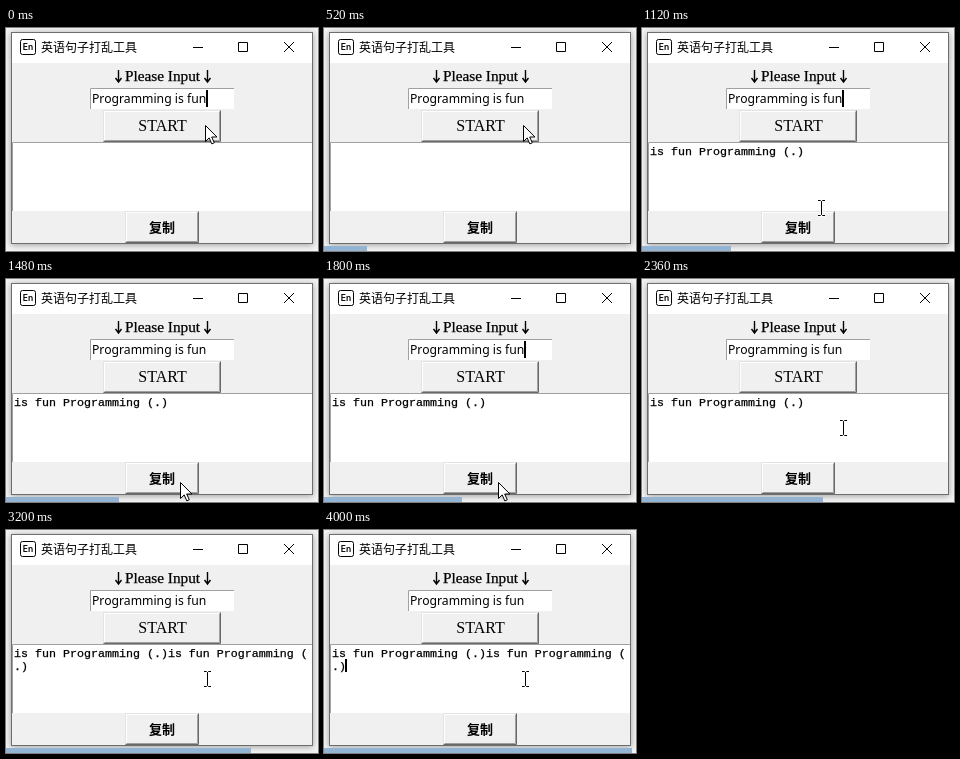
These frames come from a looping animation (312x223 px, 4040 ms). An HTML page:

```html
<!DOCTYPE html>
<html lang="zh">
<head>
<meta charset="utf-8">
<style>
  html, body { margin: 0; width: 100%; height: 100%; overflow: hidden; background: #f3f3f3; }
  svg { display: block; width: 312px; height: 223px; }
  text { white-space: pre; }
  .frame { filter: drop-shadow(0 1px 3px rgba(0, 0, 0, .35)); }
  .cjk { font-family: "Noto Sans CJK SC", "Noto Sans CJK", sans-serif; }
  .serif { font: 16px "Liberation Serif", serif; text-anchor: middle; }
  .heading { font-size: 15.3px; }
  .entry { font: 500 12.2px "Noto Sans", sans-serif; }
  .mono { font: 11.67px "Liberation Mono", monospace; }
  .heading, .mono { stroke: #000; stroke-width: .25; }
  .line { fill: none; stroke: #000; }
  .light { fill: none; stroke: #fff; }
  .pale { fill: none; stroke: #e3e3e3; }
  .dark { fill: none; stroke: #696969; }
  .mid { fill: none; stroke: #a0a0a0; }
</style>
</head>
<body>
<svg viewBox="0 0 312 223">
  <rect class="frame" x="5" y="4" width="302" height="212" fill="#6e6e6e"/>
  <rect x="6" y="5" width="300" height="30" fill="#fff"/>
  <rect x="6" y="35" width="300" height="180" fill="#f0f0f0"/>

  <rect class="line" x="14.5" y="11.5" width="15" height="15" rx="2"/>
  <text x="22" y="22" text-anchor="middle" font-family="Inter, sans-serif" font-size="8.5" font-weight="600">En</text>
  <text class="cjk" x="35" y="23.5" font-size="12">英语句子打乱工具</text>
  <path class="line" d="M187 19.5h10M232.5 14.5h9v9h-9z"/>
  <path class="line" d="M278 14l10 10m0-10l-10 10"/>

  <text class="serif heading" x="156.5" y="53">Please Input</text>
  <path class="line" stroke-width="1.4" d="M112.5 42v12m-3-4l3 4l3-4M201.5 42v12m-3-4l3 4l3-4"/>

  <rect x="84" y="60" width="144" height="21" fill="#fff"/>
  <path class="mid" d="M84.5 81V60.5H228"/>
  <text class="entry" x="86" y="75">Programming is fun</text>

  <g id="start"></g>
  <g id="copy"></g>

  <rect x="6" y="114" width="300" height="69" fill="#fff"/>
  <path class="mid" d="M6.5 183V114.5H306"/>
  <text class="mono" id="line1" x="8" y="126.5"></text>
  <text class="mono" id="line2" x="8" y="139.5"></text>
  <rect id="caret" width="2"/>

  <path id="arrow" d="M.5.5v16l3.7-3.6l2.6 6l2.5-1.100l-2.600-5.800h5.200z" fill="#fff" stroke="#000"/>
  <g id="beam" fill="none">
    <path d="M-3-7.5h2.5l1 1l1-1H4M.5-6.5v13M-3 7.5h2.5l1-1l1 1H4" stroke="#fff" stroke-width="3"/>
    <path d="M-3-7.5h2.5l1 1l1-1H4M.5-6.5v13M-3 7.5h2.5l1-1l1 1H4" stroke="#000"/>
  </g>
  <rect id="bar" y="218" height="5" fill="#93b4d2"/>
</svg>
<script>
const LOOP = 4040, STEP = 40, FRAMES = 88;
// Frames at which the bar waits one extra step
const HOLDS = [7, 14, 20, 26, 32, 37, 44, 51, 57, 63, 69, 81, 87];
const SENTENCE = 'is fun Programming (.)';
const $ = id => document.getElementById(id);
const set = (id, attrs) => {
  for (const name in attrs) $(id).setAttribute(name, attrs[name]);
};
const between = (t, from, to) => t >= from && t < to;

function drawButton(id, x, y, w, h, label, pressed) {
  const [topOuter, topInner, bottomOuter, bottomInner] = pressed
    ? ['mid', 'dark', 'light', 'pale']
    : ['pale', 'light', 'dark', 'mid'];
  const shift = pressed ? 1 : 0;
  const topLeft = d => `M${x + d} ${y + h - d}V${y + d}H${x + w - d}`;
  const bottomRight = d => `M${x + d} ${y + h - d}H${x + w - d}V${y + d}`;
  $(id).innerHTML = `
    <path class="${topOuter}" d="${topLeft(.5)}"/>
    <path class="${topInner}" d="${topLeft(1.5)}"/>
    <path class="${bottomOuter}" d="${bottomRight(.5)}"/>
    <path class="${bottomInner}" d="${bottomRight(1.5)}"/>
    <g transform="translate(${shift} ${shift})">${label}</g>`;
}

const startLabel = '<text class="serif" x="156.5" y="103">START</text>';
const copyLabel = '<text class="cjk" x="143" y="204" font-size="13" font-weight="700">复制</text>';

// Pointer stops: [time, x, y]
const STOPS = [[0, 199, 97], [840, 199, 97], [1240, 174, 203], [2000, 174, 203], [2280, 201, 149], [LOOP, 201, 149]];

function pointerAt(t) {
  const i = STOPS.findIndex(stop => t < stop[0]);
  const [t0, x0, y0] = STOPS[i - 1], [t1, x1, y1] = STOPS[i];
  const p = (t - t0) / (t1 - t0), ease = p * p * (3 - 2 * p);
  return [Math.round(x0 + (x1 - x0) * ease), Math.round(y0 + (y1 - y0) * ease)];
}

function drawCaret(t, pasted) {
  const on = (t + 160) % 900 < 600;
  const place = t < 2300 ? { x: 200, y: 62, height: 17 }
    : pasted ? { x: 21, y: 129, height: 13 }
    : { x: 161, y: 116, height: 13 };
  set('caret', { ...place, visibility: on ? 'visible' : 'hidden' });
}

function render(time) {
  const tick = Math.floor(time / STEP), t = tick * STEP;
  const frame = HOLDS.reduce((n, hold) => n >= hold ? n - 1 : n, tick);
  set('bar', { width: Math.round(312 * frame / FRAMES) });

  drawButton('start', 97, 82, 118, 32, startLabel, between(t, 640, 720));
  drawButton('copy', 119, 183, 74, 32, copyLabel, between(t, 1840, 1960));

  const pasted = t >= 3040;
  $('line1').textContent = t < 720 ? '' : SENTENCE + (pasted ? SENTENCE.slice(0, -2) : '');
  $('line2').textContent = pasted ? SENTENCE.slice(-2) : '';
  drawCaret(t, pasted);

  const [x, y] = pointerAt(t);
  const overText = between(y, 115, 183);
  const transform = `translate(${x} ${y})`;
  set('arrow', { transform, visibility: overText ? 'hidden' : 'visible' });
  set('beam', { transform, visibility: overText ? 'visible' : 'hidden' });
}

const began = performance.now();
function loop() {
  render((performance.now() - began) % LOOP);
  requestAnimationFrame(loop);
}
loop();
</script>
</body>
</html>
```
